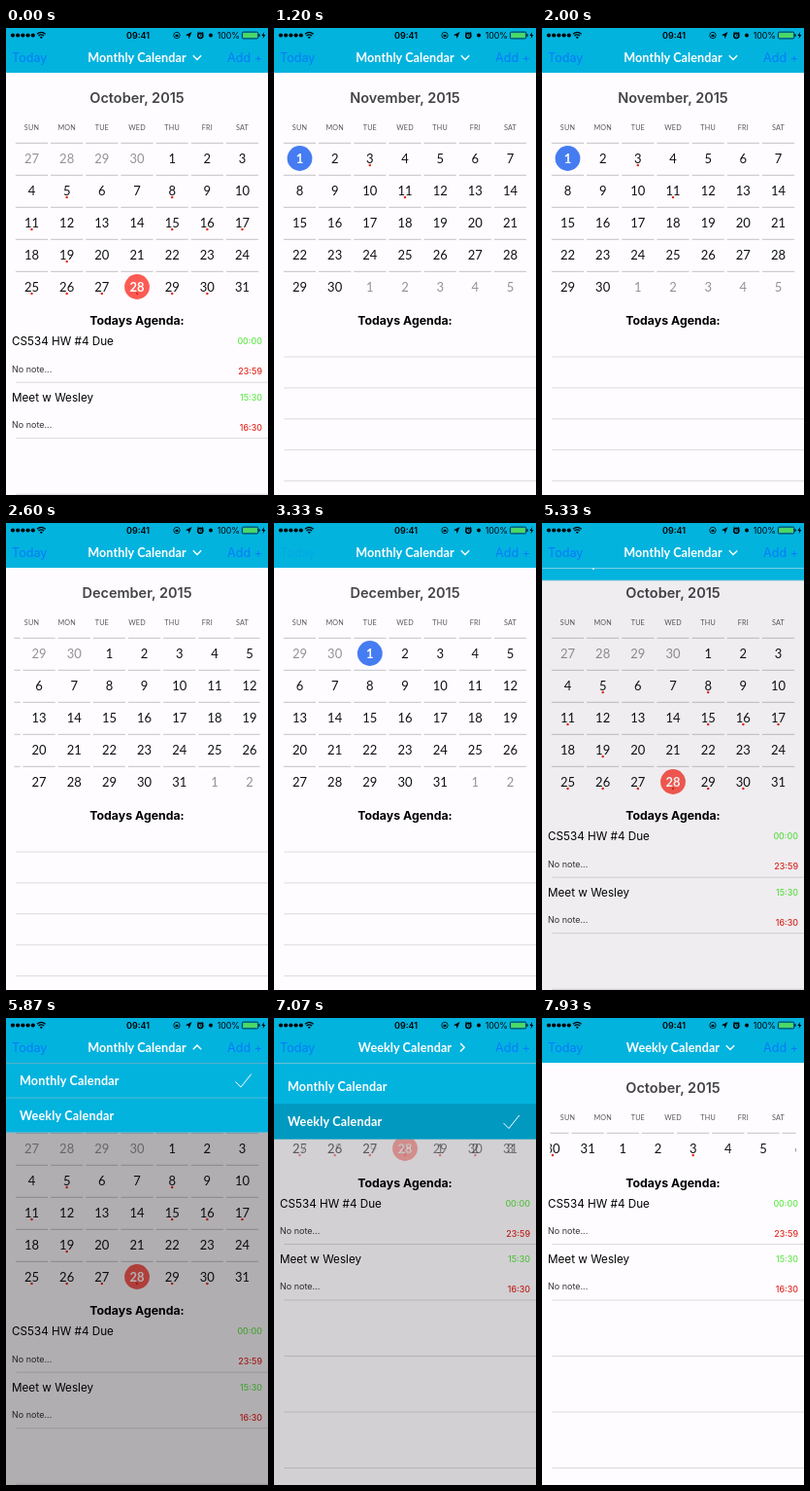
Recreate the animation shown at these times as an HTML page. Size 270 by 480 pixels, loop 8 s.

```html
<!DOCTYPE html>
<html lang="en">
<head>
<meta charset="utf-8">
<title>Calendar</title>
<style>
html, body { margin: 0; width: 100%; height: 100%; overflow: hidden; background: #fefcff; }
svg { display: block; width: 100vw; height: 100vh; }
text { font-family: Inter, "Liberation Sans", sans-serif; }
.lato { font-family: Lato, "Open Sans", sans-serif; }
</style>
</head>
<body>
<svg id="stage" viewBox="0 0 270 480">
  <defs>
    <clipPath id="calClip"><rect id="calRect" x="8.4" y="112" width="253.2" height="170"/></clipPath>
    <clipPath id="menuClip"><rect x="0" y="46.6" width="270" height="434"/></clipPath>
  </defs>
  <rect width="270" height="480" fill="#fefcff"/>
  <g id="heading"></g>
  <g clip-path="url(#calClip)"><g id="months"></g><g id="weeks"></g></g>
  <g id="agenda"><g id="busy"></g><g id="free"></g></g>
  <rect id="mask" y="46" width="270" height="434" fill="#060006"/>
  <g clip-path="url(#menuClip)"><g id="menu"></g></g>
  <g id="nav"></g>
</svg>
<script>
const LOOP = 8000, COL = 36.17, PAGE = COL * 7, ROW = 33;
const CYAN = '#02b3de', BLUE = '#087bfa', RED = '#e32a22', GREEN = '#62e94a';
const $ = id => document.getElementById(id);

function add(parent, tag, attrs) {
  const el = document.createElementNS('http://www.w3.org/2000/svg', tag);
  for (const k in attrs) el.setAttribute(k, attrs[k]);
  parent.appendChild(el);
  return el;
}
// y is the middle of the capitals
function label(parent, str, x, y, size, fill, more = {}) {
  const el = add(parent, 'text', { x, y: y + size * .36, 'font-size': size, fill, ...more });
  el.textContent = str;
  return el;
}
const line = (parent, x1, x2, y, stroke) =>
  add(parent, 'path', { d: `M${x1} ${y}H${x2}`, stroke, 'stroke-width': .8 });
const MID = { 'text-anchor': 'middle' }, END = { 'text-anchor': 'end' };
const LATO = { class: 'lato' };
const BOLD = { ...LATO, 'font-weight': 700 };
const show = (el, on) => el.setAttribute('visibility', on ? 'visible' : 'hidden');
const move = (el, x, y) => el.setAttribute('transform', `translate(${x} ${y})`);

// Calendar cells
function cell(parent, col, row, day, o = {}) {
  const x = 26.5 + col * COL, y = 134 + row * ROW;
  line(parent, x - 16.6, x + 16.6, y - 15.7, '#b4b3b6');
  label(parent, day, x, y, 13, o.other ? '#939296' : '#111', { ...LATO, ...MID });
  let badge = null;
  if (o.badge) {
    badge = add(parent, 'g', {});
    add(badge, 'circle', { cx: x, cy: y, r: 12.9, fill: o.badge });
    label(badge, day, x, y, 13, '#fff', { ...BOLD, ...MID });
  }
  if (o.dot) add(parent, 'circle', { cx: x, cy: y + 6.9, r: 1.25, fill: RED });
  return badge;
}

const MONTHS = [
  { name: 'October', first: 4, days: 31, before: 30, dots: [5, 8, 11, 15, 16, 17, 19, 25, 26, 27, 28, 29, 30], mark: 28, color: '#fb5b53' },
  { name: 'November', first: 0, days: 30, before: 31, dots: [3, 11], mark: 1, color: '#467cf2' },
  { name: 'December', first: 2, days: 31, before: 30, dots: [], mark: 1, color: '#467cf2' }
];
MONTHS.forEach((m, p) => {
  m.title = label($('heading'), m.name + ', 2015', 135, 72, 14.5, '#454448', { ...MID, 'font-weight': 600 });
  m.page = add($('months'), 'g', { transform: `translate(${p * PAGE} 0)` });
  for (let i = 0; i < 35; i++) {
    let d = i - m.first + 1;
    const other = d < 1 || d > m.days;
    if (d < 1) d += m.before;
    else if (other) d -= m.days;
    const badge = cell(m.page, i % 7, i / 7 | 0, d, {
      other, dot: !other && m.dots.includes(d), badge: !other && d === m.mark && m.color
    });
    if (badge) m.badge = badge;
  }
});
'SUN MON TUE WED THU FRI SAT'.split(' ').forEach((d, i) =>
  label($('heading'), d, 26.5 + i * COL, 102.5, 7.2, '#58575b', { ...LATO, ...MID, 'letter-spacing': .2 }));
for (let i = 0; i < 14; i++) {
  const d = i < 7 ? 25 + i : i - 6;
  cell($('weeks'), i, 0, d, { dot: i < 6 || d === 3, badge: d === 28 && '#fb5b53' });
}

// Agenda
label($('agenda'), 'Todays Agenda:', 135, 301, 12.3, '#000', { ...MID, 'font-weight': 700 });
[['CS534 HW #4 Due', '00:00', '23:59'], ['Meet w Wesley', '15:30', '16:30']].forEach(([name, from, to], i) => {
  const y = 322 + i * 57.6, g = $('busy');
  label(g, name, 6, y, 11.7, '#000');
  label(g, 'No note...', 6, y + 28.3, 9, '#333');
  label(g, from, 264, y, 8.9, GREEN, { ...END, 'font-weight': 500 });
  label(g, to, 264, y + 31.2, 8.9, RED, { ...END, 'font-weight': 500 });
});
for (let i = 0; i < 5; i++) {
  line($('busy'), 10.4, 270, 364.2 + i * 57.5, '#d2d1d5');
  line($('free'), 10.4, 270, 338 + i * 31.9, '#d2d1d5');
}

// Drop-down menu, drawn fully open
const menu = $('menu');
add(menu, 'rect', { y: -250, width: 270, height: 367.6, fill: CYAN });
line(menu, 0, 270, 82, '#69bdd3');
line(menu, 0, 270, 117.6, '#69bdd3');
const picked = add(menu, 'rect', { y: 81.6, width: 270, height: 36.4, fill: '#0199bf' });
['Monthly Calendar', 'Weekly Calendar'].forEach((s, i) =>
  label(menu, s, 14, 64 + i * 36, 12.6, '#fff', { ...BOLD, 'letter-spacing': .15 }));
const check = add(menu, 'path', { d: 'M236.5 65.5L242 71L252.8 57.5', fill: 'none', stroke: '#fff', 'stroke-width': 1 });

// Navigation and status bar
const nav = $('nav');
add(nav, 'rect', { width: 270, height: 46, fill: CYAN });
const today = label(nav, 'Today', 6, 30.3, 12.6, BLUE);
label(nav, 'Add +', 264, 30.3, 12.6, BLUE, END);
const titles = ['Monthly Calendar', 'Weekly Calendar'].map(s =>
  label(nav, s, 135, 30, 12.6, '#fff', { ...BOLD, ...MID, 'letter-spacing': .08 }));
const arrow = add(nav, 'path', { d: 'M-4.2 -2L0 2.2L4.2 -2', fill: 'none', stroke: '#fff', 'stroke-width': 1.4 });
for (let i = 0; i < 5; i++) add(nav, 'circle', { cx: 7 + i * 5.2, cy: 7.5, r: 2.1 });
const ink = { fill: 'none', stroke: '#000' };
add(nav, 'path', { d: 'M32 6.2Q36.3 2.4 40.6 6.2M33.5 8Q36.3 5.6 39.1 8', 'stroke-width': 1.2, ...ink });
add(nav, 'path', { d: 'M34.8 9.4Q36.3 8.2 37.8 9.4L36.3 11Z' });
label(nav, '09:41', 136, 7.5, 9, '#000', { ...MID, 'font-weight': 600 });
add(nav, 'circle', { cx: 176, cy: 7.5, r: 3.2, 'stroke-width': .8, ...ink });
add(nav, 'rect', { x: 174.6, y: 6.8, width: 2.8, height: 2.2 });
add(nav, 'path', { d: 'M191.5 4L188.6 11L188 8L185 7.2Z' });
add(nav, 'circle', { cx: 200.3, cy: 7.8, r: 2.6, 'stroke-width': 1.5, ...ink });
add(nav, 'path', { d: 'M197 5.4L198.6 4M203.6 5.4L202 4M200.3 6.5V8H201.6', 'stroke-width': .9, ...ink });
add(nav, 'circle', { cx: 211, cy: 7.5, r: 2 });
label(nav, '100%', 241, 7.5, 8.8, '#000', END);
add(nav, 'rect', { x: 243.4, y: 4.1, width: 16.4, height: 6.8, rx: 1.2, 'stroke-width': .7, ...ink });
add(nav, 'rect', { x: 244.4, y: 5.1, width: 14.4, height: 4.8, fill: '#4cd964' });
add(nav, 'rect', { x: 260.4, y: 6.2, width: 1.1, height: 2.6 });
add(nav, 'path', { d: 'M266.2 4L263.4 8H265.2L264.6 11L267.4 7H265.6Z' });

// Motion
const clamp = u => Math.max(0, Math.min(1, u));
const ease = u => u < .5 ? 2 * u * u : 1 - 2 * (1 - u) ** 2;
const ramp = (t, a, b) => ease(clamp((t - a) / (b - a)));
const swipe = (t, start) => ramp(t, start, start + 400);
const within = (t, a, b) => t >= a && t < b;

function spring(ms) {
  if (ms <= 0) return 0;
  const z = .7, a = 12.5 * ms / 1000, q = Math.sqrt(1 - z * z);
  return 1 - Math.exp(-z * a) * (Math.cos(q * a) + z / q * Math.sin(q * a));
}
function steps(t, table) {
  const i = table.findIndex(k => k[0] > t);
  if (i < 0) return table[table.length - 1][1];
  if (i === 0) return table[0][1];
  const [t0, v0] = table[i - 1], [t1, v1] = table[i];
  return v0 + (v1 - v0) * (t - t0) / (t1 - t0);
}
const CLOSE = [[6940, 0], [7000, 4.5], [7070, 6.7], [7135, -6], [7200, -38], [7270, -74]];

function draw(t) {
  const weekly = t >= 6935;

  const page = swipe(t, 550) + swipe(t, 2250) - swipe(t, 3560) - swipe(t, 4180);
  move($('months'), -page * PAGE, 0);
  move($('weeks'), -swipe(t, 7665) * PAGE, 0);
  MONTHS.forEach((m, i) => show(m.title, Math.round(page) === i));
  show(MONTHS[1].badge, within(t, 950, 2690) || within(t, 3980, 4610));
  show(MONTHS[2].badge, within(t, 2690, 3980));
  const fade = ramp(t, 6940, 7200);
  $('months').setAttribute('opacity', 1 - fade);
  $('weeks').setAttribute('opacity', fade);
  $('calRect').setAttribute('height', weekly ? 38 : 170);

  const free = within(t, 950, 4610);
  show($('busy'), !free);
  show($('free'), free);
  move($('agenda'), 0, weekly ? -131.7 : 0);

  const open = spring(t - 5273);
  const drop = weekly ? steps(t, CLOSE) : (open - 1) * 72;
  move(menu, 0, drop);
  show(menu, within(t, 5273, 7270));
  $('mask').setAttribute('opacity', .31 * Math.min(open, 1) * (1 - ramp(t, 6950, 7210)));
  show(picked, within(t, 6900, 7270));
  move(check, 0, t >= 6900 ? 36 : 0);

  show(titles[0], !weekly);
  show(titles[1], weekly);
  const turn = 180 * (ramp(t, 5290, 5790) + ramp(t, 6870, 7270));
  arrow.setAttribute('transform', `translate(${weekly ? 194 : 197} 30.3) rotate(${turn})`);
  today.setAttribute('opacity', within(t, 3260, 3460) ? .2 : .2 + .8 * (t < 3260 ? 1 : ramp(t, 3460, 3700)));
}

const start = performance.now();
function tick() {
  draw((performance.now() - start) % LOOP);
  requestAnimationFrame(tick);
}
tick();
</script>
</body>
</html>
```
